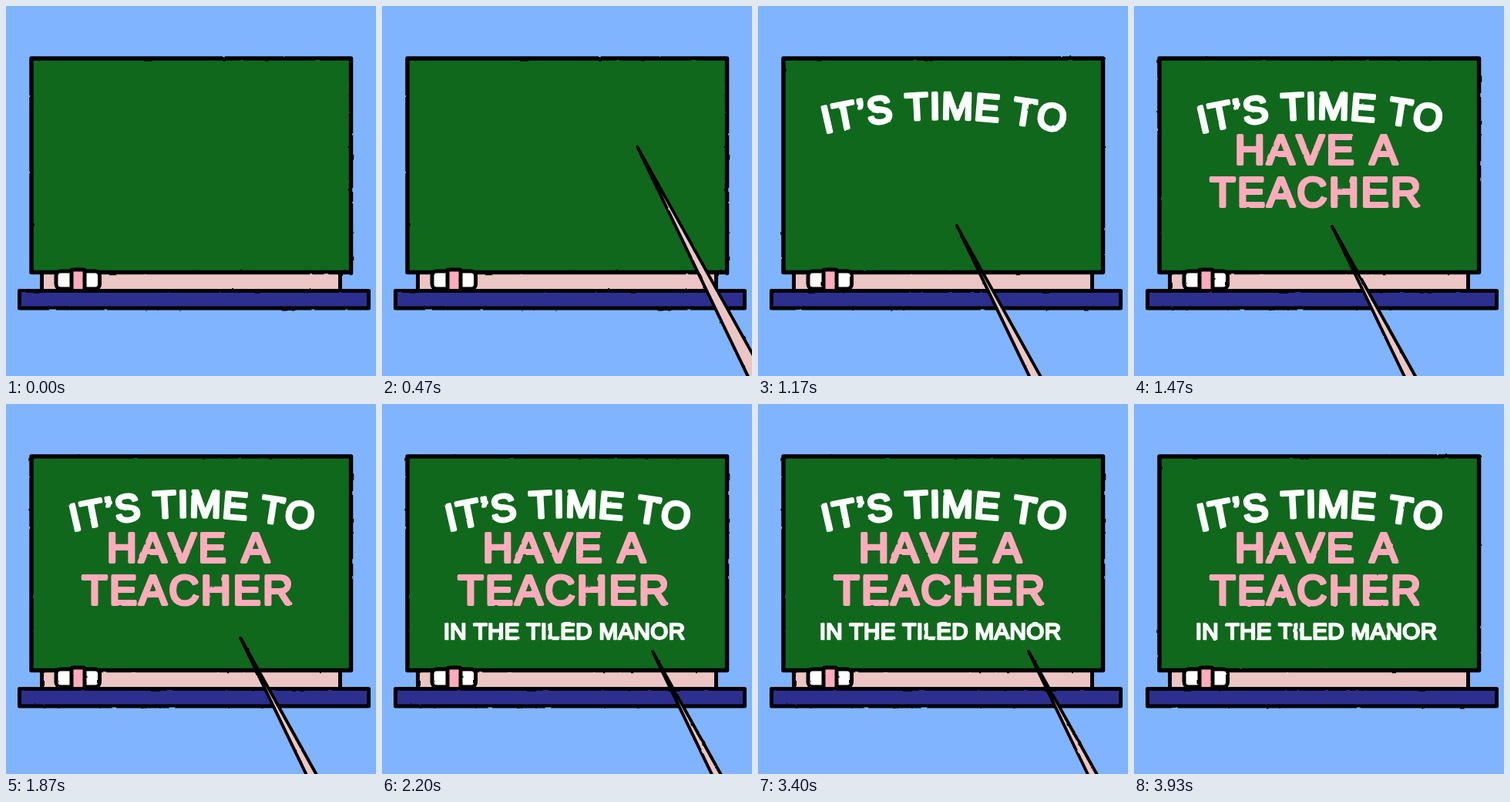
These frames come from a looping animation (480 by 480 pixels, 4010 ms). An HTML page:

```html
<!DOCTYPE html>
<html lang="en">
<head>
<meta charset="utf-8">
<title>Chalkboard</title>
<style>
  html, body { margin: 0; width: 100%; height: 100%; overflow: hidden; background: #80b4ff; }
  svg { display: block; width: 100vw; height: 100vh; }
  .ink { stroke: #000; stroke-width: 5; stroke-linejoin: round; }
  text {
    font-family: "Liberation Sans", Arial, sans-serif;
    font-kerning: none;
    text-anchor: middle;
    stroke-linejoin: round;
    stroke-linecap: round;
  }
  .white { fill: #fff; stroke: #fff; }
  .pink { fill: #ffabbb; stroke: #ffabbb; }
  .arc { font-size: 49px; letter-spacing: 1.2px; stroke-width: 4px; }
  .big { font-size: 54px; letter-spacing: 2.6px; stroke-width: 4px; }
  .small { font-size: 29.5px; letter-spacing: .4px; stroke-width: 2.4px; }
</style>
</head>
<body>
<svg viewBox="0 0 480 480">
  <defs>
    <filter id="rough" filterUnits="userSpaceOnUse" x="-10" y="-10" width="500" height="500"
            color-interpolation-filters="sRGB">
      <feTurbulence id="noise" type="fractalNoise" baseFrequency=".09" numOctaves="1" seed="1" result="n"/>
      <feDisplacementMap in="SourceGraphic" in2="n" scale="2.2" xChannelSelector="R" yChannelSelector="G"/>
    </filter>
    <path id="curve" d="M42 177.3A667 667 0 0 1 442 177.3"/>
  </defs>
  <rect width="480" height="480" fill="#80b4ff"/>
  <g filter="url(#rough)">
    <rect class="ink" x="46.5" y="340" width="387" height="30" fill="#ecc6c4"/>
    <rect class="ink" x="33" y="68" width="414.5" height="277.5" fill="#10681c" style="stroke-width:5.5"/>
    <rect class="ink" x="17.5" y="369.5" width="453" height="22.5" fill="#2d2f8f"/>
    <rect class="ink" x="65" y="344" width="56.5" height="23" rx="6" fill="#fff"/>
    <rect class="ink" x="85" y="342" width="17" height="27.5" rx="1" fill="#ffabbb"/>

    <g id="line1">
      <text class="white arc"><textPath href="#curve" startOffset="50%">IT’S TIME TO</textPath></text>
    </g>
    <g id="line2">
      <text class="pink big" x="237.5" y="204.7">HAVE A</text>
      <text class="pink big" x="236.5" y="259.5">TEACHER</text>
    </g>
    <g id="line3">
      <text class="white small" x="236.5" y="304.5">IN THE TILED MANOR</text>
    </g>

    <path id="stick" class="ink" d="M0 0L202.5 420L233.5 420Z" fill="#ecc6c4" style="stroke-width:4"/>
  </g>
</svg>
<script>
  const LOOP = 4010;
  const BOIL = 100;
  const get = id => document.getElementById(id);
  const noise = get('noise'), stick = get('stick');

  // Pointer tip: time, x, y
  const stops = [
    [100, 224, 490],
    [530, 337, 166],
    [1210, 257, 286],
    [1530, 257, 286],
    [2210, 351, 321],
    [3480, 351, 321],
    [3930, 224, 483]
  ];

  const lines = [['line1', 500], ['line2', 1200], ['line3', 2200]]
    .map(([id, at]) => ({ el: get(id), at }));

  const ease = u => u * u * (3 - 2 * u);

  function tipAt(t) {
    const i = stops.findIndex(s => s[0] > t);
    if (i < 1) return null;
    const [t0, x0, y0] = stops[i - 1], [t1, x1, y1] = stops[i];
    const k = ease((t - t0) / (t1 - t0));
    return [x0 + (x1 - x0) * k, y0 + (y1 - y0) * k];
  }

  function draw(t) {
    noise.setAttribute('seed', 1 + Math.floor(t / BOIL) % 4);
    for (const { el, at } of lines) el.style.display = t >= at ? '' : 'none';
    const tip = tipAt(t);
    stick.style.display = tip ? '' : 'none';
    if (tip) stick.setAttribute('transform', `translate(${tip[0]} ${tip[1]})`);
  }

  const start = performance.now();
  function tick() {
    draw((performance.now() - start) % LOOP);
    requestAnimationFrame(tick);
  }
  draw(0);
  requestAnimationFrame(tick);
</script>
</body>
</html>
```
